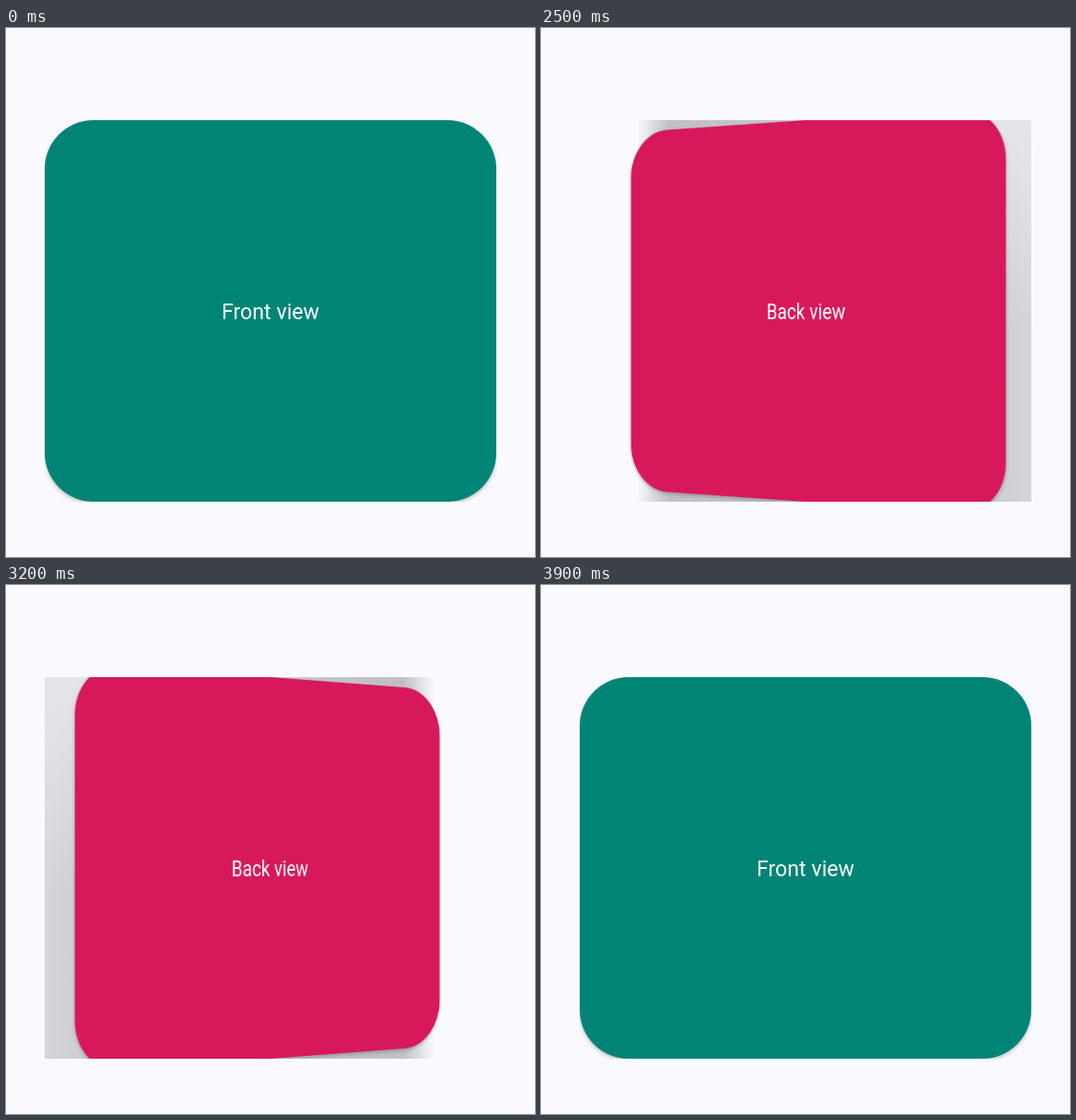
These frames come from a looping animation (574 px wide and 574 px high, 4000 ms). An HTML page:

```html
<!DOCTYPE html>
<html lang="en">
<head>
<meta charset="utf-8">
<title>Flip card</title>
<style>
  html, body { margin: 0; width: 100%; height: 100%; overflow: hidden; background: #faf9fd; }
  #view { position: absolute; left: 42px; top: 100px; width: 490px; height: 414px; overflow: hidden; }
  #shadow, #card { position: absolute; inset: 0; }
  #card {
    box-sizing: border-box;
    padding-top: 2px;
    border-radius: 53px;
    box-shadow: 0 2px 4px rgba(0, 0, 0, .24);
    display: flex; align-items: center; justify-content: center;
    color: #fff; font: 400 23.2px Roboto, sans-serif; white-space: pre;
  }
</style>
</head>
<body>
<div id="view">
  <div id="shadow"></div>
  <div id="card"></div>
</div>
<script>
const LOOP = 4000, STEP = 100, FLIP = 400;
const HALF = 245, DEPTH = 2000;
const STARTS = [1766, 2385, 2919, 3448];
const SIDES = [['Front view', '#008476'], ['Back view', '#d7195c']];
const card = document.getElementById('card');
const shadow = document.getElementById('shadow');

// Side shown and its rotation in degrees at a time in the loop.
function poseAt(time) {
  let side = 0, angle = 0;
  for (const start of STARTS) {
    const p = (time - start) / FLIP;
    if (p <= 0) break;
    const turn = p >= 1 ? 180 : 90 * (1 - Math.cos(Math.PI * p));
    if (turn >= 90) side = 1 - side;
    angle = turn < 90 ? -turn : 180 - turn;
  }
  return { side, angle };
}

// Soft at the far edge, spreading past the near edge, lighter at the near top.
function shadowFor(angle) {
  if (!angle) return 'none';
  const rad = Math.abs(angle) * Math.PI / 180;
  const s = Math.sin(rad), c = Math.cos(rad), lift = HALF * s;
  const far = HALF - HALF * c / (1 + lift / DEPTH);
  const near = HALF + HALF * c / (1 - lift / DEPTH);
  const strength = Math.min(1, 3 * s);
  const toRight = angle < 0;
  const black = a => `rgba(0,0,0,${a})`;
  const nearX = toRight ? near : 2 * HALF - near;
  return `radial-gradient(260px 230px at ${nearX}px 0, rgba(250,249,253,.5), rgba(250,249,253,0)),` +
    `linear-gradient(to ${toRight ? 'right' : 'left'}, ${black(0)} ${far + 6}px,` +
    `${black(.23 * strength)} ${far + 6 + 42 * c}px, ${black(.11 + .06 * strength)} ${near}px,` +
    `${black(0)} ${near + 20 + 1.6 * lift}px)`;
}

function draw(time) {
  const { side, angle } = poseAt(time);
  const [label, color] = SIDES[side];
  card.textContent = label;
  card.style.background = color;
  card.style.transform = angle ? `perspective(${DEPTH}px) rotateY(${angle}deg)` : 'none';
  shadow.style.background = shadowFor(angle);
}

const begin = performance.now();
let last = -1;
function tick() {
  const time = Math.floor((performance.now() - begin + 2) % LOOP / STEP) * STEP;
  if (time !== last) draw(last = time);
  requestAnimationFrame(tick);
}
tick();
</script>
</body>
</html>
```
